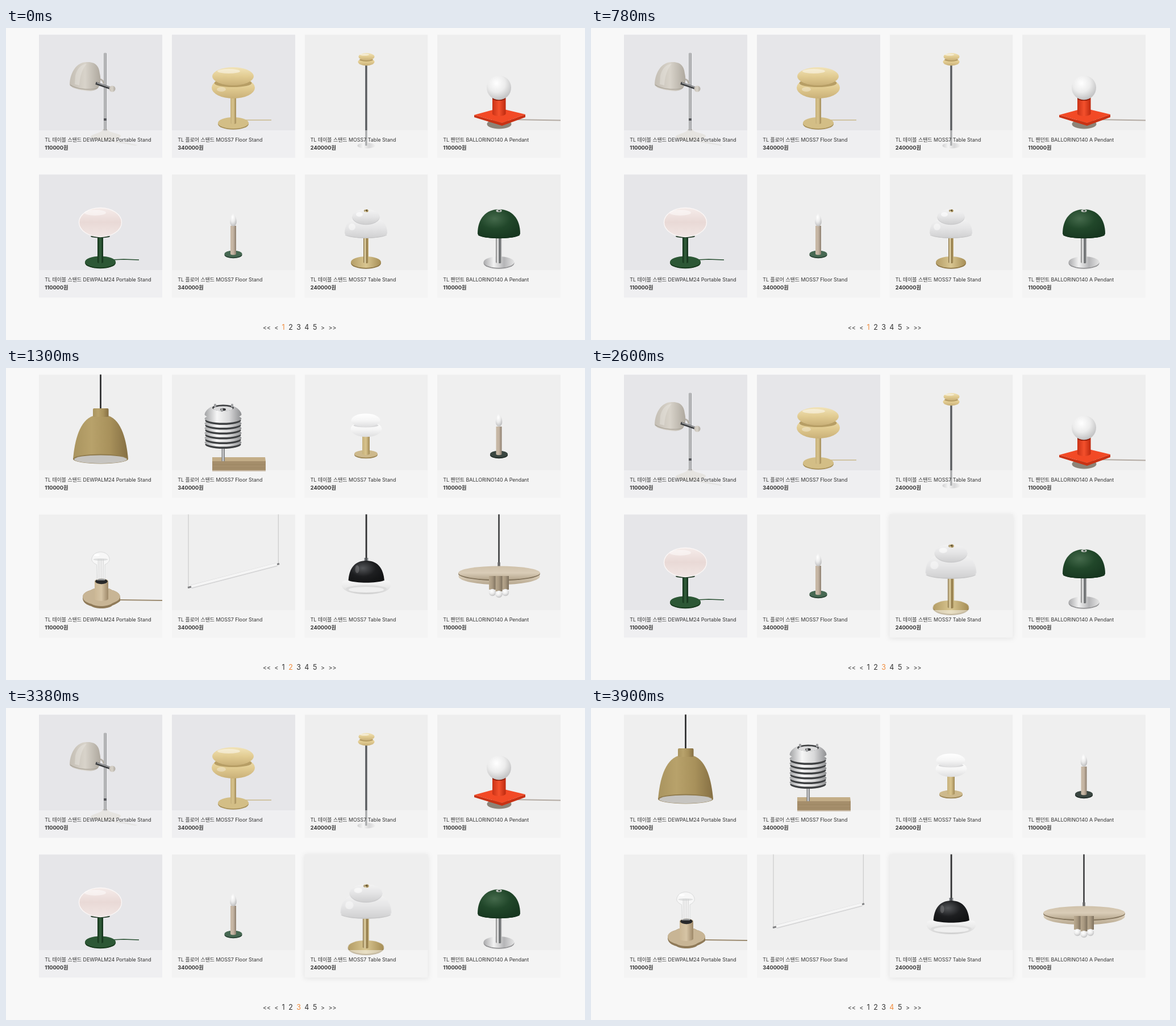
Recreate the animation shown at these times as an HTML page. Size 1019 by 549 pixels, loop 5200 ms.

```html
<!DOCTYPE html>
<html>
<head>
<meta charset="utf-8">
<title>Lamp catalogue</title>
<style>
  html, body { margin: 0; width: 100%; height: 100%; overflow: hidden; background: #f8f8f8; }
  #stage { display: block; width: 1019px; height: 549px; }
  text { font-family: Inter, "Noto Sans CJK KR", "Noto Sans CJK", sans-serif; fill: #333; }
  .name { font-size: 8.9px; }
  .price { font-size: 9.2px; font-weight: 700; }
  .pager text { font-size: 12.5px; text-anchor: middle; }
  .pager .arrow { font-size: 10.5px; }
  .scene { animation: flip 2.6s step-end infinite; }
  .even { animation-delay: -1.3s; }
  .page { animation: lit 5.2s step-end infinite; }
  .shadow { filter: drop-shadow(0 1px 5px rgba(0, 0, 0, .09)); animation: hover 5.2s step-end infinite; }
  .zoom { transform-origin: 634px 366px; animation: zoom 5.2s step-end infinite; }
  @keyframes flip { 0% { visibility: visible } 50%, 100% { visibility: hidden } }
  @keyframes lit { 0% { fill: #f08a3a } 25%, 100% { fill: #333 } }
  @keyframes hover { 0% { visibility: hidden } 50%, 100% { visibility: visible } }
  @keyframes zoom { 0% { transform: none } 50%, 100% { transform: scale(1.19) } }
</style>
</head>
<body>
<svg id="stage" viewBox="0 0 1019 549"></svg>
<script>
const COLS = [58, 292, 525.5, 759], ROWS = [11.5, 257.5], SIZE = 217;
const NAMES = [
  ['TL 테이블 스탠드 DEWPALM24 Portable Stand', '110000원'],
  ['TL 플로어 스탠드 MOSS7 Floor Stand', '340000원'],
  ['TL 테이블 스탠드 MOSS7 Table Stand', '240000원'],
  ['TL 팬던트 BALLORINO140 A Pendant', '110000원']
];

// Colour ramps: across (h), down (v) and rounded (r)
const RAMPS = {
  chrome: ['h', '#777', '#eee', '#55585a', '#c8c8c8'],
  steel: ['h', '#727476', '#d6d6d8', '#636567'],
  dark: ['h', '#909296', '#3d4043', '#c4c5c7'],
  gold: ['h', '#7c6638', '#eee0b5', '#88703e', '#cdb983'],
  brassFoot: ['h', '#b49d66', '#d9c691', '#a58d55'],
  stem: ['h', '#c6b17c', '#d8c38c', '#a18a57'],
  wood: ['h', '#c9b9a7', '#c4b4a2', '#8d7f70'],
  tan: ['h', '#cbb795', '#d6c4a5', '#9d8868'],
  tube: ['h', '#b9a98f', '#a89880', '#7d705d'],
  green: ['h', '#123118', '#34613d', '#0f2c16'],
  red: ['h', '#c93216', '#f4502c', '#bd2a0f'],
  silver: ['h', '#a9a9ab', '#f2f2f2', '#b5b5b7', '#e4e4e4'],
  shade: ['h', '#c4beb4', '#d8d3ca', '#aea89e'],
  brass: ['h', '#a9945f', '#b8a26b', '#a8915b', '#856f43'],
  slat: ['h', '#a2a3a5', '#f6f6f6', '#d8d8d9', '#8e8f91'],
  cream: ['v', '#f1e3b8', '#e2cc92', '#c9b078'],
  milk: ['v', '#ffffff', '#f6f6f6', '#dededf'],
  brim: ['v', '#f6f6f6', '#e9e9e9', '#cfcfcf'],
  pale: ['v', '#f4f4f4', '#e5e5e6', '#cfcfd0'],
  pink: ['v', '#f5ecea', '#e9d9d6', '#f1e6e4'],
  disc: ['v', '#cfc1aa', '#d9ccb7', '#b5a68d'],
  globe: ['r', '#ffffff', '#ececec', '#bdbdbe'],
  forest: ['r', '#456a4c', '#21472a', '#173720'],
  coal: ['r', '#55575a', '#1d1e20', '#101112']
};

const attrs = o => Object.entries(o).map(([k, v]) => `${k}="${v}"`).join(' ');
const paint = f => RAMPS[f] ? `url(#${f})` : f;
const oval = (cx, cy, rx, ry, f, more = {}) =>
  `<ellipse ${attrs({ cx, cy, rx, ry, fill: paint(f), ...more })}/>`;
const box = (x, y, width, height, f, more = {}) =>
  `<rect ${attrs({ x, y, width, height, fill: paint(f), ...more })}/>`;
const shape = (d, f, more = {}) => `<path ${attrs({ d, fill: paint(f), ...more })}/>`;
const line = (d, stroke, w, more = {}) =>
  shape(d, 'none', { stroke, 'stroke-width': w, ...more });
const foot = (x, y, rx, ry, top, side) => oval(x, y + 1.8, rx, ry, side) + oval(x, y, rx, ry, top);
const shine = (x, y, rx, ry, opacity = .6) => oval(x, y, rx, ry, '#fff', { opacity });

function ramp(id, [kind, ...colors]) {
  const stops = colors.map((c, i) =>
    `<stop offset="${i / (colors.length - 1)}" stop-color="${c}"/>`).join('');
  return kind === 'r'
    ? `<radialGradient id="${id}" cx=".4" cy=".32" r=".72">${stops}</radialGradient>`
    : `<linearGradient id="${id}" ${kind === 'v' ? 'x2="0" y2="1"' : ''}>${stops}</linearGradient>`;
}

const candle = (x, y, stemTop, footY, base, side) =>
  foot(x, footY, 15.5, 6, base, side) +
  box(x - 5, stemTop, 10, footY - stemTop, 'wood') + oval(x, footY, 5, 1.8, 'wood') +
  shape(`M${x} ${y}C${x + 4} ${y + 5} ${x + 6.5} ${y + 12} ${x + 5.5} ${y + 18}
    C${x + 4} ${y + 25} ${x - 4} ${y + 25} ${x - 5.5} ${y + 18}
    C${x - 6.5} ${y + 12} ${x - 4} ${y + 5} ${x} ${y}Z`, 'globe');

const stands = [
  // Desk lamp on a pole
  shape('M174 194L232 206L228 207L186 200Z', '#cfcecc') +
  shape('M149 190C158 185 169 184 171 178H178C180 184 195 184 202 189C204 200 148 202 149 190Z', '#d3cfc8') +
  box(172.5, 43.5, 4, 138, 'steel', { rx: 1.5 }) +
  box(172, 159, 5, 4, '#55565a') +
  line('M157 90Q171 88 172 98', '#b5b0a8', 3) +
  shape('M112 99C113 78 124 60 142 60C158 59 164 68 165 80C167 88 167 97 163 104C160 110 150 112 138 110C124 108 112 104 112 99Z', 'shade') +
  line('M113 100C123 107 147 111 162 105', '#a9a398', 1.2) +
  shape('M122 84C125 71 132 64 142 63C134 72 130 85 129 101L121 99Z', '#ece9e3', { opacity: .4 }) +
  line('M158 97L184 106', '#3d3f42', 4.5) + line('M160 96.5L183 104.5', '#d0d0d2', 1.3) +
  oval(187, 107, 5.5, 5.5, 'shade'),

  // Stacked shade, cream
  line('M420 162H467', '#c8b88c', 1.5) +
  foot(400, 167, 27, 10, '#d3be86', '#a68f58') +
  box(395, 122, 10, 45, 'stem') + oval(400, 167, 5, 2, 'stem') +
  oval(400, 105, 38, 19, 'cream') + oval(399.5, 97, 33, 7, '#b79e65') +
  oval(399.5, 85, 36.5, 16, 'cream') + shine(392, 76, 20, 4, .45) + shine(379, 108, 8, 4, .3),

  // Tall floor lamp
  oval(634, 207, 15.5, 5, 'silver') + box(632, 65, 4.2, 142, 'dark') +
  oval(634, 59.5, 14.5, 6.8, 'cream') + oval(634, 56, 12, 3, '#b79e65') +
  oval(634.5, 50.5, 14, 6.5, 'cream') + shine(631, 47, 8, 1.8, .5),

  // Globe on a square plate
  line('M889 161L976 162.5', '#b3aaa2', 2) +
  oval(868, 169, 21.5, 8.5, '#8d8377') +
  shape('M824 153L873 167L914 152V157L873 172L824 157Z', '#c93214') +
  shape('M824 153L868 141L914 152L873 167Z', '#f24a26') +
  box(856, 122, 23.5, 29, 'red') + oval(867.7, 151, 11.7, 4, 'red') +
  oval(867.5, 124, 11.7, 4, '#8d1e0a') + oval(867.5, 105, 21.5, 21.5, 'globe'),

  // Pebble shade on green stem
  line('M185 408L207 407L234 408', '#2c5235', 1.7) +
  foot(166, 411.5, 27, 10, '#2c5735', '#143519') +
  box(161, 366, 10, 46, 'green') + oval(166, 412, 5, 2, 'green') +
  oval(166, 366.5, 17, 3, '#263d2b') +
  oval(166, 342, 37.5, 25.5, 'pink', { stroke: '#fbf7f6', 'stroke-width': 1.4 }) +
  shine(157, 325, 19, 5, .45),

  candle(400, 325.5, 348, 397.5, '#466852', '#263f30'),

  // Double white dome
  `<g class="zoom">` + foot(633.5, 412, 26.5, 10, 'brassFoot', '#8d7645') +
  box(629, 366, 9, 46, 'gold') + oval(633.5, 412, 4.5, 2, 'gold') +
  shape('M596 361C596 346 604 337 616 334H652C663 337 671 346 671 361C668 373 599 373 596 361Z', 'pale') +
  line('M597 364C607 371 660 371 670 364', '#c3c3c4', 1) +
  oval(633.5, 333, 24, 13.2, '#c6c6c8') + oval(633.5, 332, 24, 13.2, 'pale') +
  shine(622, 328, 6, 4) + shine(609, 350, 6, 6, .45) +
  oval(634, 321.5, 4, 2.5, 'gold') + oval(634, 321, 1.7, 1, '#51452b') + `</g>`,

  // Green dome
  foot(867.5, 412, 27, 10, 'silver', '#929294') +
  box(862, 366, 10.5, 46, 'chrome') + oval(867.3, 412, 5.2, 2, 'chrome') +
  shape('M830 362C830 335 845 319 867.5 319C890 319 905 335 905 362C902 373 833 373 830 362Z', 'forest') +
  line('M831 364C841 371 894 371 904 364', '#12301a', 1.2) +
  oval(867.5, 321.5, 5, 2.5, '#c9cbc8') + oval(868, 321.5, 2, 1.2, '#33483a')
];

const slats = [131, 123, 114.5, 106, 97.5, 89].map(y =>
  oval(382, y + 3.5, 31.5, 7.5, '#3f4143') + oval(382, y, 32.5, 7.5, 'slat')).join('');
const tubes = [[856, 395], [879, 395], [867.5, 398]].map(([x, y]) =>
  box(x - 6, 366, 12, y - 371, 'tube') + oval(x, y, 6.2, 6.2, 'globe')).join('');
const filaments = [162, 165, 168, 171].map(x =>
  line(`M${x} 370L${x + .4} 336`, '#c4c4c4', .8)).join('');

const pendants = [
  // Bell pendant
  box(165.2, 11, 2.6, 62, '#252627') +
  shape('M118 160C121 128 129 92 154 84H180C204 92 212 128 215 160C209 169 124 169 118 160Z', 'brass') +
  box(153, 71, 27.5, 15, 'brass', { rx: 2 }) +
  oval(166.5, 160, 48.5, 8.5, '#8f7a4c') + oval(166.5, 160.7, 46.5, 7.2, '#c6c4c0'),

  // Slatted shade on a wood block
  box(363, 164, 94, 18, '#a58e6b') + shape('M363 164V157H456L457 164Z', '#c3ad87') +
  line('M364 170H456M364 176H456', '#8f7854', .7, { opacity: .6 }) +
  box(379.5, 136, 5.5, 28, 'steel') + slats +
  shape('M349.5 82C351 72 364 64 382 64C400 64 413 72 414.5 82C411 92 353 92 349.5 82Z', 'slat') +
  oval(382, 70, 19, 5.5, '#3f4143') + oval(382, 71.5, 17, 4.3, '#dcdcdd') +
  oval(382, 73, 5, 2.2, '#303133') +
  [366, 396, 378].map((x, i) => box(x, i < 2 ? 63 : 71, 4, 6, '#a0a1a3', { rx: 1.5 })).join(''),

  // Stacked shade, white
  foot(633.5, 151, 20.5, 6.5, '#cdb98c', '#9d8757') +
  box(627, 118, 13, 33, 'stem') + oval(633.5, 151, 6.5, 2.2, 'stem') +
  oval(634, 107.5, 27.5, 13.8, 'milk') + oval(633.5, 101, 22, 3.5, '#dadadb') +
  oval(633, 92, 25.5, 11.8, 'milk'),

  candle(867.5, 79.5, 103, 151.5, '#3a4641', '#202a26'),

  // Bare bulb on a scalloped base
  line('M199 408L275 409', '#9c8b70', 2) +
  shape('M135 403C136 395 143 393 149 391C158 385 179 385 187 391C195 393 201 397 201 404V410C196 414 192 416 187 418C181 424 159 425 150 419C143 417 134 413 135 403Z', '#8f7a58') +
  shape('M135 402C136 395 143 393 149 391C158 385 179 385 187 391C195 393 201 397 201 403C199 410 193 411 187 414C179 420 159 421 150 415C142 413 135 409 135 402Z', '#c8b595') +
  box(156, 375, 24, 31, 'tan') + oval(168, 406, 12, 4, 'tan') +
  oval(168, 375.5, 12, 5, '#b9a684') + oval(168, 375.5, 10.8, 4.7, '#27282a') +
  shape('M160 373L159.5 346C153 343 150 339 151 335C154 320 179 320 182 335C183 339 180 343 174 346V373Z', '#fff', { 'fill-opacity': .45, stroke: '#d2d3d4', 'stroke-width': .8 }) +
  filaments + oval(166.5, 337, 13, 2, '#cfd0d1', { opacity: .6 }) + shine(160, 329, 5, 2, .9),

  // Hanging tube
  line('M321 257V385M479.3 257V345', '#c3c3c4', 1) +
  line('M320 386.5L481 344.5', '#808183', 3) +
  line('M326 385L477 345.8', '#d5d5d6', 6.5) + line('M326 384.4L477 345.2', '#f5f5f5', 4.4),

  // Bowler pendant
  box(632.7, 257, 2.8, 80, '#303133') + box(630.5, 334, 7.3, 9, 'dark') +
  shape('M602.5 380C602 354 613 339 634 339C655 339 666 354 666 380Z', 'coal') +
  shine(618, 354, 3.5, 7, .18) +
  shape('M590.5 382C590 374 596 373 603 374C617 379 651 379 665 374C672 373 678 374 677.5 382C677 391 662 398 634 398C606 398 591 391 590.5 382Z', 'brim') +
  oval(634, 388.5, 36, 6.5, '#dcdcdc') + oval(634, 390, 31, 5, '#efefef'),

  // Wide disc pendant
  box(866.3, 257, 2.4, 92, '#303133') + box(865.3, 342, 4.4, 7, '#6a6a6a') +
  oval(868, 366.5, 71.5, 15, 'disc') + oval(868, 362, 72, 12.5, '#83745c') +
  oval(868, 360.5, 72, 12, 'disc') + tubes
];

function card(art, i, bg) {
  const x = COLS[i % 4], y = ROWS[i >> 2], [name, price] = NAMES[i % 4];
  return `<svg x="${x}" y="${y}" width="${SIZE}" height="${SIZE}" viewBox="${x} ${y} ${SIZE} ${SIZE}">` +
    box(x, y, SIZE, SIZE, bg) + art +
    box(x, y + 168.5, SIZE, 48.5, '#fafafa', { opacity: .5 }) +
    `<text class="name" x="${x + 10.3}" y="${y + 188.2}">${name}</text>` +
    `<text class="price" x="${x + 10.3}" y="${y + 202}">${price}</text></svg>`;
}

const pager = [
  ['&lt;&lt;', 459], ['&lt;', 476], [1, 488], [2, 501], [3, 515],
  [4, 529.2], [5, 543.6], ['&gt;', 557.6], ['&gt;&gt;', 574.5]
].map(([t, x]) => {
  const live = t >= 1 && t <= 4
    ? `class="page" style="animation-delay:${(t - 5) * 1.3}s"` : t > 4 ? '' : 'class="arrow"';
  return `<text x="${x}" y="531.3" ${live}>${t}</text>`;
}).join('');

const cool = [0, 1, 4];
document.getElementById('stage').innerHTML =
  `<defs>${Object.entries(RAMPS).map(([id, r]) => ramp(id, r)).join('')}</defs>` +
  box(COLS[2], ROWS[1], SIZE, SIZE, '#eee', { class: 'shadow' }) +
  `<g class="scene">${stands.map((a, i) => card(a, i, cool.includes(i) ? '#e6e6e9' : '#eee')).join('')}</g>` +
  `<g class="scene even">${pendants.map((a, i) => card(a, i, '#efefef')).join('')}</g>` +
  `<g class="pager">${pager}</g>`;
</script>
</body>
</html>
```
